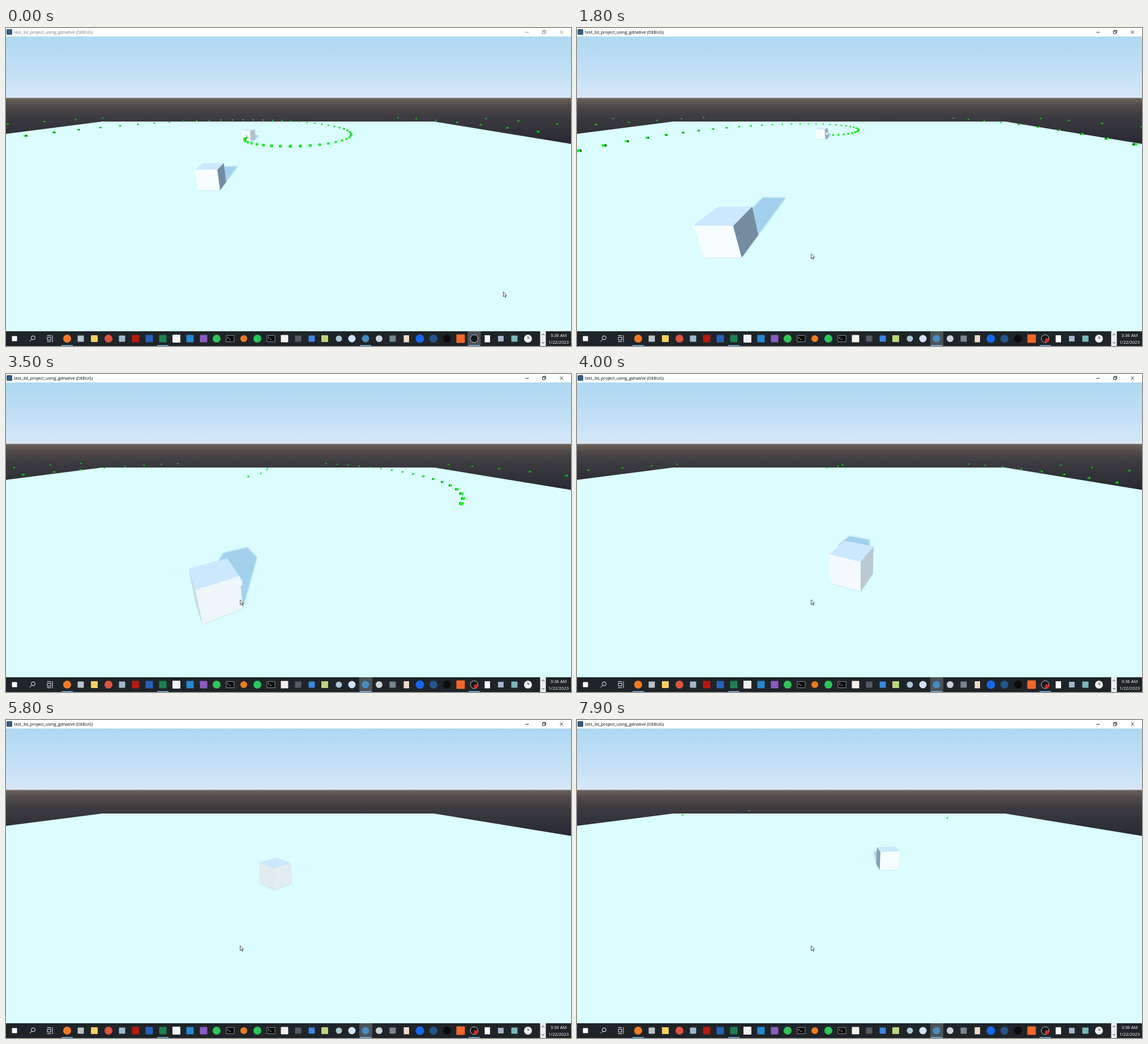
An HTML page with a canvas for the animation above (8 s loop, 998 px wide and 561 px high).

```html
<!DOCTYPE html>
<html lang="en">
<head>
<meta charset="utf-8">
<title>Turret scene</title>
<style>
html, body { margin: 0; width: 100%; height: 100%; overflow: hidden; background: #fff; }
#stage { position: relative; width: 998px; height: 561px; overflow: hidden; }
canvas, svg { position: absolute; left: 0; top: 0; display: block; }
text { font-family: "Open Sans", "Noto Sans", sans-serif; }
</style>
</head>
<body>
<div id="stage">
<canvas id="view" width="998" height="561"></canvas>
<svg id="ui" width="998" height="561" viewBox="0 0 998 561">
  <rect width="998" height="15" fill="#fff"/>
  <rect x="1" y="2" width="10" height="10" rx="1.5" fill="#35597a"/>
  <g id="caption" fill="#000" stroke="#000">
    <text x="14" y="10.2" font-size="7.44" stroke="none">test_3d_project_using_gdnative (DEBUG)</text>
    <path d="M917.5 7.5h6M947.5 5.5h4.500v4.500h-4.500zM949 5.500v-1.500h4.500v4.500h-1.500M978.500 4.500l5.500 5.500M984 4.500l-5.500 5.500" fill="none" stroke-width=".8"/>
  </g>
  <rect y="535" width="998" height="26" fill="#1f2428"/>
  <rect id="hot" y="535" width="23" height="26" fill="#4b5358"/>
  <g id="icons"></g>
  <rect x="943.500" y="535" width="10" height="26" fill="#eceff0"/>
  <path d="M946.500 542l2.200-2.500 2.200 2.500M946.500 554l2.200 2.500 2.200-2.500" fill="none" stroke="#333"/>
  <g fill="#fff" font-size="7.6" text-anchor="middle">
    <text x="976" y="545">3:36 AM</text>
    <text x="976" y="557">1/22/2023</text>
  </g>
  <path id="cursor" d="M0 0v8.600l2-1.800 1.400 3 1.300-.6-1.300-2.900h2.600z" fill="#fff" stroke="#222" stroke-width=".8"/>
</svg>
</div>
<script>
const $ = id => document.getElementById(id);
const ctx = $('view').getContext('2d');
const RAD = Math.PI / 180;

// Taskbar: o = disc, s = square, p = page, t = terminal
const ICONS = [
  [15, 's', '#fff', 9], [108, 'o', '#f47b26', 14], [132, 's', '#b8c4ca', 11], [156, 's', '#f6cf62', 12],
  [181, 'o', '#dc5343', 14], [205, 's', '#9db9cd', 11], [229, 's', '#b51a12', 13], [253, 's', '#2862b8', 13],
  [277, 's', '#1d8050', 13], [301, 's', '#eef2f5', 14], [325, 's', '#2788cd', 13], [349, 's', '#8a5cc2', 13],
  [372, 'o', '#32c35a', 14], [396, 't'], [420, 'o', '#ee7c1d', 12], [444, 'o', '#2bc65c', 14], [468, 't'],
  [492, 's', '#f3f0ee', 13], [516, 's', '#555b5e', 11], [540, 's', '#3a86df', 11], [563, 's', '#b9d67b', 12],
  [588, 'o', '#a9c6d5', 11], [611, 'o', '#d3e2fc', 13], [635, 'o', '#478cbf', 13], [659, 'o', '#c9d3d8', 12],
  [683, 's', '#78868b', 11], [707, 'p', '#efd9c9'], [731, 'o', '#1667ed', 15], [755, 'o', '#24558a', 14],
  [779, 'o', '#0b0c0d', 14], [803, 's', '#f2682a', 15], [827, 'o', '#15181a', 14], [850, 'p', '#fafafa'],
  [874, 's', '#a4b4ca', 10], [898, 's', '#79b8bb', 11], [922, 'o', '#eef0f1', 14]
];
const drawIcon = ([x, kind, fill, d]) => {
  if (kind === 'o') return `<circle cx="${x}" cy="548" r="${d / 2}" fill="${fill}"/>`;
  if (kind === 's') return `<rect x="${x - d / 2}" y="${548 - d / 2}" width="${d}" height="${d}" rx="1" fill="${fill}"/>`;
  if (kind === 'p') return `<rect x="${x - 4.5}" y="542" width="9.500" height="12.500" fill="${fill}"/>`;
  return `<path d="M${x - 7} 542.500h14v11h-14z" fill="#080808" stroke="#a8adaf" stroke-width=".8"/>
    <path d="M${x - 5} 545l2 1.500-2 1.500m3 1h3" fill="none" stroke="#eee" stroke-width=".8"/>`;
};
$('icons').innerHTML = ICONS.map(drawIcon).join('') +
  [108, 277, 635, 827].map(x => `<rect x="${x - 10}" y="559.500" width="20" height="1.500" fill="#76b9ed"/>`).join('') + `
  <g fill="none" stroke="#fff">
    <circle cx="48" cy="546.500" r="3.400"/><path d="M45.600 549l-4 4"/>
    <path d="M73 545.500h6v5h-6zM73 543.500v-1h6v1M73 552.500v1h6v-1M82 542v12" stroke-width=".9"/>
    <circle cx="827" cy="548" r="6.800" stroke="#d8dcde" stroke-width=".9"/>
    <path d="M922 543.500v4.500l3-2" stroke="#444"/>
  </g>
  <circle id="rec" cx="830" cy="551" r="3.600" fill="#e02424"/>`;

// Camera: height, focal length, pitch
const H = 3.95, F = 371, PITCH = Math.atan(152 / F);
const SP = Math.sin(PITCH), CP = Math.cos(PITCH);
const depth = (y, z) => z * CP + (H - y) * SP;
function project([x, y, z]) {
  const d = depth(y, z);
  return [499 + F * x / d, 275 - F * (z * SP - (H - y) * CP) / d];
}

const mix = (a, b, k) => a + (b - a) * k;
function along(keys, t) {
  let i = 1;
  while (i < keys.length - 1 && keys[i][0] < t) i++;
  const a = keys[i - 1], b = keys[i];
  const k = Math.min(1, Math.max(0, (t - a[0]) / (b[0] - a[0])));
  return a.slice(1).map((v, j) => mix(v, b[j + 1], k));
}

// time, x, z, heading
const PLAYER = [
  [0, -3.66, 9.37, 90], [1.8, -3.65, 4.95, 90], [2.8, -3.64, 3.96, 90], [3.4, -2.2, 4.2, 25],
  [4, -.22, 5.6, 66], [4.9, -4.565, 10.415, 129], [5.4, -1.6, 9.8, -20], [5.9, -.34, 8.47, 60],
  [6.4, -.34, 8.47, 190], [6.7, -.34, 8.47, 350], [7.02, .17, 9.16, 420], [7.9, 1.52, 10.98, 456]
];
// time, heading
const SHOTS = [
  [2.295, 89.4], [2.41, 89.2], [2.607, 90], [2.737, 93], [5.945, 66], [6.147, 122],
  [6.236, 137], [6.403, 189], [6.542, 237], [6.665, 314], [6.8, 12], [7.02, 60]
];
const CURSOR = [[.1, 878.5, 465.5], [1, 413.7, 398.3]];
const FOCUS = .5, KILL = 2.9, LIFE = 2.6, RATE = 60;
const turretAngle = t => 250 - 345 * t;
const turretPos = t => [-4 + .05 * Math.min(t, 1.8), 21.3 + .55 * Math.max(-2, Math.min(t, 1.8))];
const reach = age => 60 * (1 - Math.exp(-.58 * age));

const WHITE = { dark: [115, 140, 160], lit: [247, 253, 255], top: '#cbe8ff' };
const GREEN = { dark: [8, 112, 18], lit: [20, 250, 30], top: '#18e424' };

function makeBox(x, y, z, size, yaw, paint) {
  const base = [0, 1, 2, 3].map(k => {
    const a = (yaw + 90 * k - 45) * RAD, r = size * Math.SQRT1_2;
    return [x + r * Math.cos(a), z + r * Math.sin(a)];
  });
  return { x, y, z, size, yaw, paint, base, lo: y - size / 2, hi: y + size / 2, far: depth(y, z) };
}

function trace(points) {
  points.forEach((p, i) => i ? ctx.lineTo(...p) : ctx.moveTo(...p));
  ctx.closePath();
}
function poly(points, fill) {
  ctx.beginPath();
  trace(points);
  ctx.fillStyle = fill;
  ctx.fill();
}

function drawBox(b) {
  for (let k = 0; k < 4; k++) {
    const a = (b.yaw + 90 * k) * RAD, nx = Math.cos(a), nz = Math.sin(a);
    if (nx * b.x + nz * b.z + b.size / 2 >= 0) continue;
    const p = b.base[k], q = b.base[(k + 1) % 4];
    const light = 1 - Math.pow(1 - Math.max(0, -nz), 1.5);
    const rgb = b.paint.dark.map((v, i) => Math.round(mix(v, b.paint.lit[i], light)));
    poly([[p[0], b.lo, p[1]], [q[0], b.lo, q[1]], [q[0], b.hi, q[1]], [p[0], b.hi, p[1]]].map(project), `rgb(${rgb})`);
  }
  poly(b.base.map(([x, z]) => project([x, b.hi, z])), b.paint.top);
}

function hull(points) {
  points.sort((a, b) => a[0] - b[0] || a[1] - b[1]);
  const half = list => {
    const out = [];
    for (const p of list) {
      while (out.length > 1) {
        const [a, b] = out.slice(-2);
        if ((b[0] - a[0]) * (p[1] - a[1]) - (b[1] - a[1]) * (p[0] - a[0]) > 0) break;
        out.pop();
      }
      out.push(p);
    }
    return out.slice(0, -1);
  };
  return [...half(points), ...half([...points].reverse())];
}
// The sun stands low behind the camera
const shadow = b => hull([b.lo, b.hi].flatMap(y => b.base.map(([x, z]) => project([x, 0, z + 2.65 * y]))));
const castsShadow = b => b.far < (b.size < 1 ? 13 : 24);

function tank([x, z], yaw) {
  const a = yaw * RAD;
  return [
    makeBox(x, .5, z, 1, yaw, WHITE),
    makeBox(x + .57 * Math.cos(a), .5, z + .57 * Math.sin(a), .2, yaw, WHITE)
  ];
}
function bullet([x, z], angle, age) {
  const r = reach(age), a = angle * RAD;
  return makeBox(x + r * Math.cos(a), .34, z + r * Math.sin(a), .18, angle, GREEN);
}

function boxesAt(t) {
  const list = [];
  const [px, pz, yaw] = along(PLAYER, t);
  list.push(...tank([px, pz], yaw));
  if (t < KILL) list.push(...tank(turretPos(t), turretAngle(t)));
  for (let n = Math.ceil((t - LIFE) * RATE); n <= Math.min(t, KILL) * RATE; n++) {
    const s = n / RATE;
    list.push(bullet(turretPos(s), turretAngle(s), t - s));
  }
  for (const [s, angle] of SHOTS) {
    if (t >= s && t - s < LIFE) list.push(bullet(along(PLAYER, s), angle, t - s));
  }
  return list.filter(b => b.far > 1.5 && b.far < 41.7).sort((a, b) => b.far - a.far);
}

function gradient(y0, y1, stops) {
  const g = ctx.createLinearGradient(0, y0, 0, y1);
  stops.forEach(([at, c]) => g.addColorStop(at, c));
  return g;
}
const SKY = gradient(15, 123.5, [[0, '#afd8f2'], [.5, '#bfdff5'], [.85, '#d0e5f7'], [1, '#d6e6f4']]);
const GROUND = gradient(123, 205, [[0, '#a5a5a4'], [.02, '#6b615a'], [.16, '#514b4a'], [.4, '#3c3b40'], [1, '#272933']]);
const FLOOR = [[0, 186.8], [170, 165], [756, 165], [998, 204.5], [998, 535], [0, 535]];

function drawScene(t) {
  ctx.fillStyle = SKY;
  ctx.fillRect(0, 15, 998, 109);
  ctx.fillStyle = GROUND;
  ctx.fillRect(0, 123, 998, 412);
  poly(FLOOR, '#dbfdff');

  const boxes = boxesAt(t);
  ctx.save();
  ctx.beginPath();
  trace(FLOOR);
  ctx.clip();
  ctx.filter = 'blur(0.8px)';
  ctx.beginPath();
  boxes.filter(castsShadow).forEach(b => trace(shadow(b)));
  ctx.fillStyle = '#a3d0ec';
  ctx.fill();
  ctx.restore();
  boxes.forEach(drawBox);
}

function drawUi(t) {
  const active = t >= FOCUS;
  $('caption').setAttribute('opacity', active ? 1 : .55);
  $('hot').setAttribute('x', active ? 624 : 815.5);
  $('rec').setAttribute('opacity', active ? 1 : 0);
  $('cursor').setAttribute('transform', `translate(${along(CURSOR, t)})`);
}

let start, last = -1;
function tick(now) {
  start ??= now;
  const step = Math.floor((now - start) % 8000 / 100);
  if (step !== last) {
    last = step;
    drawScene(step / 10);
    drawUi(step / 10);
  }
  requestAnimationFrame(tick);
}
requestAnimationFrame(tick);
</script>
</body>
</html>
```
